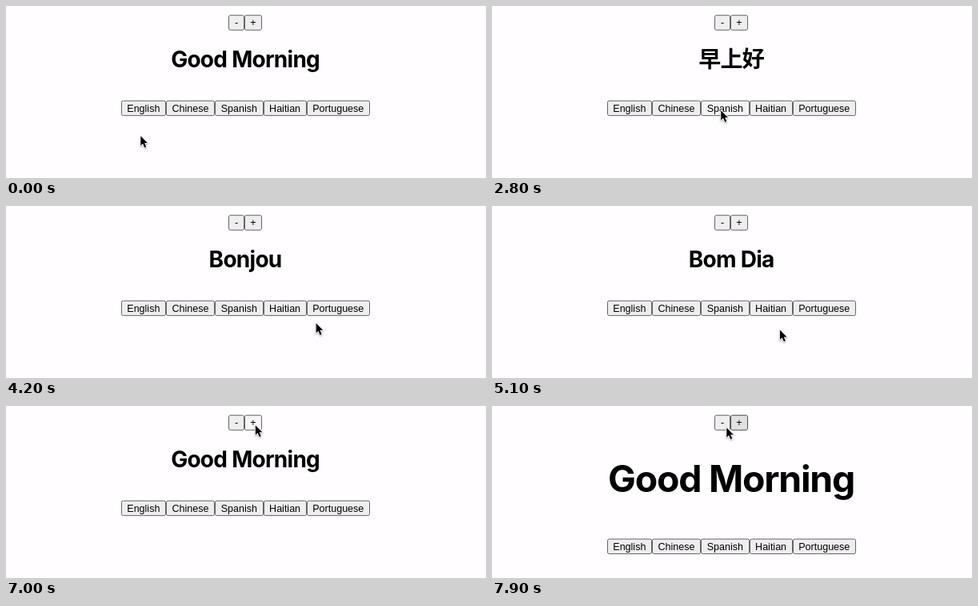
An HTML page with a canvas for the animation above (8000 ms loop, 600 by 216 pixels).

```html
<!DOCTYPE html>
<html lang="en">
<head>
<meta charset="utf-8">
<title>Greeting</title>
<style>
  html, body { margin: 0; width: 100%; height: 100%; overflow: hidden; background: #fffdff; }
  canvas { display: block; width: 600px; height: 216px; }
</style>
</head>
<body>
<canvas id="stage"></canvas>
<script>
const W = 600, H = 216, MID = 299.3;
const LOOP = 8000, STEP = 100, PRESS = 80, HOVER_FROM = 1500;
const BUTTON_H = 19.5;
const LABEL_FONT = '12.53px "Liberation Sans", Arial, sans-serif';
const HEADING_FAMILY = 'Inter, "Noto Sans CJK SC", "Noto Sans CJK", sans-serif';
const LANGUAGES = ['English', 'Chinese', 'Spanish', 'Haitian', 'Portuguese'];

const canvas = document.getElementById('stage');
const ctx = canvas.getContext('2d');
const dpr = window.devicePixelRatio || 1;
canvas.width = W * dpr;
canvas.height = H * dpr;

// Pointer moves; sag bends the way downwards, a click changes the greeting
const home = { x: 168, y: 163 };
const moves = [
  { start: 500, end: 900, x: 217, y: 131, click: 1580, say: '早上好' },
  { start: 1700, end: 2100, x: 286, y: 131, click: 2880, say: 'Buenos Dias' },
  { start: 3000, end: 3400, x: 353, y: 131, sag: 16, click: 3880, say: 'Bonjou' },
  { start: 3900, end: 4400, x: 406, y: 131, sag: 18, click: 4880, say: 'Bom Dia' },
  { start: 4900, end: 5600, x: 172, y: 131, sag: 42, click: 5780, say: 'Good Morning' },
  { start: 5800, end: 6400, x: 342, y: 31 },
  { start: 6500, end: 6800, x: 311.5, y: 24 },
  { start: 7800, end: 7900, x: 293, y: 27 }
];
const growClicks = Array.from({ length: 4 }, (_, i) => 7060 + 240 * i);
const clicks = moves.filter(m => m.click).map(m => m.click).concat(growClicks);

const smooth = k => k * k * (3 - 2 * k);

function pointerAt(t) {
  let { x, y } = home;
  for (const m of moves) {
    if (t < m.start) break;
    const k = smooth(Math.min(1, (t - m.start) / (m.end - m.start)));
    x += (m.x - x) * k;
    y += (m.y - y) * k + (m.sag || 0) * Math.sin(Math.PI * k);
  }
  return { x, y };
}

function drawRow(labels, top, hover, pressed) {
  ctx.font = LABEL_FONT;
  ctx.letterSpacing = '0px';
  const widths = labels.map(s => ctx.measureText(s).width + 15.2);
  let x = MID - widths.reduce((a, b) => a + b) / 2;
  labels.forEach((label, i) => {
    const left = Math.round(x), right = Math.round(x + widths[i]);
    const over = hover && hover.x >= left && hover.x < right &&
      hover.y >= top && hover.y < top + BUTTON_H;
    ctx.beginPath();
    ctx.roundRect(left + 0.5, top + 0.5, right - left - 1, BUTTON_H - 1, 2);
    ctx.fillStyle = !over ? '#efeeef' : pressed ? '#f5f5f5' : '#e1e0e1';
    ctx.fill();
    ctx.strokeStyle = over && !pressed ? '#4c4c4c' : '#646464';
    ctx.lineWidth = 1;
    ctx.stroke();
    ctx.fillStyle = '#000';
    ctx.fillText(label, x + widths[i] / 2, top + 14.1);
    x += widths[i];
  });
}

function drawHeading(text, size, baseline) {
  ctx.font = `700 ${size}px ${HEADING_FAMILY}`;
  ctx.letterSpacing = `${-0.026 * size}px`;
  ctx.fillStyle = '#000';
  ctx.fillText(text, MID - 0.2, baseline);
}

function drawPointer({ x, y }) {
  const arrow = new Path2D('M0 0V14.2L3.2 11.2L5.7 17L8.1 16L5.7 10.2H10Z');
  ctx.save();
  ctx.translate(x + 0.3, y + 0.2);
  ctx.scale(0.86, 0.86);
  ctx.lineJoin = 'round';
  ctx.lineWidth = 2;
  ctx.strokeStyle = '#fff';
  ctx.shadowColor = 'rgba(0,0,0,0.35)';
  ctx.shadowBlur = 2 * dpr;
  ctx.shadowOffsetY = dpr;
  ctx.stroke(arrow);
  ctx.shadowColor = 'transparent';
  ctx.fillStyle = '#000';
  ctx.fill(arrow);
  ctx.restore();
}

function draw(t) {
  ctx.setTransform(dpr, 0, 0, dpr, 0, 0);
  ctx.fillStyle = '#fffdff';
  ctx.fillRect(0, 0, W, H);
  ctx.textAlign = 'center';

  const level = growClicks.filter(c => c <= t).length;
  const last = moves.filter(m => m.click <= t).pop();
  const pressed = clicks.some(c => t >= c - PRESS && t < c);
  // Buttons react one step after the pointer arrives
  const hover = t >= HOVER_FROM ? pointerAt(t - STEP) : null;

  drawRow(['-', '+'], 11.2, hover, pressed);
  drawHeading(last ? last.say : 'Good Morning', 28 + 4.6 * level, 77.4 + 7.7 * level);
  drawRow(LANGUAGES, 118.6 + 12 * level, hover, pressed);
  drawPointer(pointerAt(t));
}

const start = performance.now();
function tick() {
  const t = (performance.now() - start) % LOOP;
  draw(Math.floor(t / STEP) * STEP);
  requestAnimationFrame(tick);
}
tick();
</script>
</body>
</html>
```
